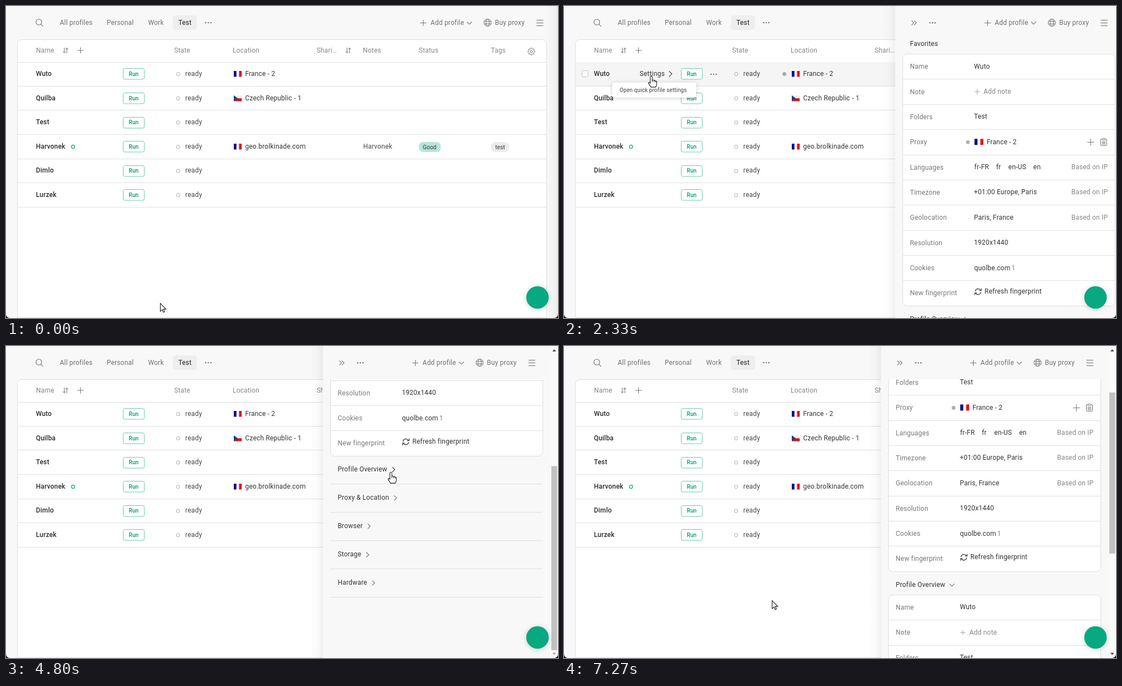
Write an HTML page with a canvas that moves like this. It is 996 by 562 pixels and loops after 7340 ms.

```html
<!DOCTYPE html>
<html lang="en">
<head>
<title>Quick profile settings</title>
<style>
html, body { margin: 0; width: 100%; height: 100%; overflow: hidden; background: #f8f8f8; }
canvas { display: block; }
</style>
</head>
<body>
<canvas id="stage" width="996" height="562"></canvas>
<script>
const W = 996, H = 562, LOOP = 7340, STEP = 200 / 3;
const PANEL_X = 572, ROW_H = 43.6, FIELD_H = 45.35, OPEN_H = 129;
const ctx = document.getElementById('stage').getContext('2d');

const GREY = '#707070', SOFT = '#868686', DARK = '#333', LINE = '#e0e0e0', GREEN = '#06a982';

const profiles = [
  { name: 'Wuto', flag: 'fr', place: 'France - 2' },
  { name: 'Quilba', flag: 'cz', place: 'Czech Republic - 1' },
  { name: 'Test' },
  { name: 'Harvonek', flag: 'fr', place: 'geo.brolkinade.com', tagged: true },
  { name: 'Dimlo' },
  { name: 'Lurzek' }
];
const favorites = ['Name', 'Note', 'Folders', 'Proxy', 'Languages', 'Timezone',
  'Geolocation', 'Resolution', 'Cookies', 'New fingerprint'];
const sections = ['Profile Overview', 'Proxy & Location', 'Browser', 'Storage', 'Hardware'];

// ---- timing ----
const ease = {
  lin: u => u,
  in: u => u * u,
  out: u => 1 - (1 - u) ** 2,
  both: u => u * u * (3 - 2 * u),
  slide: u => 1 - (1 - u) ** 3.05
};

// Each key is [time, values, ease used to arrive there].
const cursorKeys = [
  [533, [278, 535]], [1067, [203, 255], 'in'], [1333, [172, 149], 'out'],
  [1667, [157, 126], 'both'], [2800, [157, 126]], [2933, [232, 122], 'in'],
  [3400, [854, 232], 'out'], [4467, [854, 232]], [4800, [694, 227], 'both'],
  [5200, [694, 227]], [5533, [817, 249], 'both'], [6000, [817, 249]],
  [6400, [94, 533], 'both'], [6467, [46, 551]], [6533, [30, 580]],
  [7067, [30, 580]], [7133, [101, 547]], [7267, [375, 458], 'out']
];
const panelKeys = [[2133, [424]], [2467, [0], 'slide']];
const openKeys = [[4933, [0]], [5200, [1], 'both']];
const scrollKeys = [
  [3600, [0]], [3800, [84], 'in'], [4200, [342], 'out'], [5200, [342]],
  [5533, [471], 'both'], [5667, [471]], [6000, [134], 'both']
];

function sample(keys, t) {
  if (t <= keys[0][0]) return keys[0][1];
  for (let i = 1; i < keys.length; i++) {
    const [t0, a] = keys[i - 1], [t1, b, kind = 'lin'] = keys[i];
    if (t < t1) {
      const u = ease[kind]((t - t0) / (t1 - t0));
      return a.map((v, j) => v + (b[j] - v) * u);
    }
  }
  return keys[keys.length - 1][1];
}

// ---- drawing helpers ----
function text(s, x, y, color = DARK, { size = 12, weight = 400, align = 'left' } = {}) {
  ctx.font = `${weight} ${size}px Roboto, sans-serif`;
  ctx.letterSpacing = size < 12 ? '0.1px' : '0.2px';
  ctx.textAlign = align;
  ctx.fillStyle = color;
  ctx.fillText(s, x, Math.round(y));
  return ctx.measureText(s).width;
}
function box(x, y, w, h, r, fill, stroke) {
  ctx.beginPath();
  ctx.roundRect(x, y, w, h, r);
  if (fill) { ctx.fillStyle = fill; ctx.fill(); }
  if (stroke) { ctx.strokeStyle = stroke; ctx.lineWidth = 1; ctx.stroke(); }
}
function path(points, color, width = 1) {
  ctx.beginPath();
  for (let i = 0; i < points.length; i += 2) ctx.lineTo(points[i], points[i + 1]);
  ctx.strokeStyle = color;
  ctx.lineWidth = width;
  ctx.stroke();
}
function disc(x, y, r, fill) {
  ctx.beginPath();
  ctx.arc(x, y, r, 0, 7);
  ctx.fillStyle = fill;
  ctx.fill();
}
function ring(x, y, r, color, width = 1) {
  ctx.beginPath();
  ctx.arc(x, y, r, 0, 7);
  ctx.strokeStyle = color;
  ctx.lineWidth = width;
  ctx.stroke();
}
function rule(x0, x1, y, color = LINE) {
  ctx.fillStyle = color;
  ctx.fillRect(x0, Math.round(y - 0.5), x1 - x0, 1);
}
function plus(x, y, r, color) {
  path([x - r, y, x + r, y], color);
  path([x, y - r, x, y + r], color);
}
function dots(x, y, color = GREY) {
  for (const d of [-4.7, 0, 4.7]) disc(x + d, y, 1.2, color);
}
function chevron(x, y, w, h, color) { path([x, y - h, x + w, y, x, y + h], color, 1.1); }
function chevronDown(x, y, color) { path([x - 4.3, y - 2, x, y + 2.3, x + 4.3, y - 2], color, 1.1); }
function sortIcon(x, y) {
  path([x - 2.3, y - 5, x - 2.3, y + 4.5], GREY);
  path([x - 4.6, y + 2, x - 2.3, y + 4.5, x, y + 2], GREY);
  path([x + 2.3, y + 5, x + 2.3, y - 4.5], GREY);
  path([x, y - 2, x + 2.3, y - 4.5, x + 4.6, y - 2], GREY);
}
function flag(kind, x, y, w, h) {
  const part = (color, px, py, pw, ph) => {
    ctx.fillStyle = color;
    ctx.fillRect(x + px * w, y + py * h, pw * w, ph * h);
  };
  if (kind === 'fr') {
    part('#f4f4f4', 0, 0, 1, 1);
    part('#000f94', 0, 0, 1 / 3, 1);
    part('#e3101c', 2 / 3, 0, 1 / 3, 1);
  } else {
    part('#f0f0f0', 0, 0, 1, 0.5);
    part('#d7141a', 0, 0.5, 1, 0.5);
    ctx.beginPath();
    ctx.moveTo(x, y);
    ctx.lineTo(x + w / 2, y + h / 2);
    ctx.lineTo(x, y + h);
    ctx.fillStyle = '#11457e';
    ctx.fill();
  }
}
function gear(x, y) {
  ctx.beginPath();
  for (let i = 0; i <= 64; i++) {
    const a = i / 64 * Math.PI * 2;
    const r = 5.6 + Math.max(-0.9, Math.min(0.9, 1.8 * Math.cos(8 * a)));
    ctx.lineTo(x + r * Math.cos(a), y + r * Math.sin(a));
  }
  ctx.strokeStyle = GREY;
  ctx.lineWidth = 1;
  ctx.stroke();
  ring(x, y, 2.2, GREY);
}
function globe(x, y) {
  ring(x, y, 6.5, GREY);
  ctx.beginPath();
  ctx.ellipse(x, y, 3, 6.5, 0, 0, 7);
  ctx.stroke();
  path([x - 6, y - 2.3, x + 6, y - 2.3], GREY);
  path([x - 6, y + 2.3, x + 6, y + 2.3], GREY);
}
function refreshIcon(x, y) {
  ctx.strokeStyle = DARK;
  ctx.lineWidth = 1.2;
  for (const a of [0, Math.PI]) {
    ctx.save();
    ctx.translate(x, y);
    ctx.rotate(a);
    ctx.beginPath();
    ctx.arc(0, 0, 5.2, Math.PI * 1.02, Math.PI * 1.85);
    ctx.stroke();
    path([5.8, -6, 5.8, -2.3, 2.2, -2.3], DARK, 1.2);
    ctx.restore();
  }
}
function clipboard(x, y) {
  box(x - 5.5, y - 5, 11, 11.5, 1, null, GREY);
  box(x - 2.5, y - 6.5, 5, 3, 1, '#fff', GREY);
  for (const d of [-0.5, 1.7, 3.9]) path([x - 3.3, y + d, x + 3.3, y + d], GREY);
}

// ---- page ----
function topRight(x) {
  plus(x + 6, 30.5, 5.5, GREY);
  text('Add profile', x + 19, 34, GREY);
  chevronDown(x + 89, 30.5, GREY);
  globe(x + 122, 30);
  text('Buy proxy', x + 135.2, 34, GREY);
  for (const y of [25.5, 30.5, 35.5]) path([x + 210, y, x + 222.5, y], GREY);
}
function tabs() {
  ring(59.2, 29, 5.2, GREY, 1.1);
  path([63, 32.8, 67, 36.8], GREY, 1.1);
  text('All profiles', 97, 34, GREY);
  text('Personal', 181.7, 34, GREY);
  text('Work', 256.4, 34, GREY);
  box(301, 17, 43.5, 26, 5, '#eeeeee');
  text('Test', 311, 34, '#222');
  dots(365, 30);
}
function tableHead() {
  const heads = { Name: 54.2, State: 303.5, Location: 409, 'Shari\u2026': 560.4, Notes: 644, Status: 744.8, Tags: 875 };
  for (const label in heads) text(label, heads[label], 84, SOFT);
  sortIcon(107.5, 80);
  plus(134.5, 80, 5.5, GREY);
  sortIcon(617.5, 80);
  gear(948, 82);
  rule(21, 975, 101);
}
function tableRow(p, i, hovered, onSettings) {
  const mid = 122.3 + ROW_H * i, base = 126 + ROW_H * i;
  if (hovered) {
    const top = Math.round(101 + ROW_H * i);
    ctx.fillStyle = '#f5f5f5';
    ctx.fillRect(21, top, 954, ROW_H);
    box(32.5, Math.round(mid) - 5.5, 11, 11, 2, '#fafafa', '#c9c9c9');
    const tone = onSettings ? DARK : '#959595';
    text('Settings', 136.4, base, tone);
    chevron(189.5, mid, 5.2, 5, tone);
    dots(270, mid + 0.7);
    disc(397.6, mid + 0.2, 3.5, '#a8a8a8');
  }
  rule(21, 975, 101 + ROW_H * (i + 1) - 0.3);
  text(p.name, 54, base, '#2b2b2b', { weight: 500 });
  box(211.5, Math.round(mid - 10) + 0.5, 38, 19.5, 3, '#fff', '#6ac9b0');
  text('Run', 221.6, base, '#009a75', { size: 10, weight: 500 });
  ring(310.5, mid + 0.4, 3, '#a5a5a5');
  text('ready', 323.6, base, '#484848');
  if (p.flag) {
    flag(p.flag, 411, Math.round(mid - 5), 14.3, 10.5);
    text(p.place, 431.6, base);
  }
  if (p.tagged) {
    ring(121, mid + 0.4, 3, '#1bb08c', 1.3);
    text(p.name, 644.5, base, '#484848');
    box(745, 245, 39.5, 18, 8, '#b5e6da');
    text('Good', 752, 258, DARK, { size: 10.2 });
    box(875, 245, 33, 18, 8, '#ececee');
    text('test', 882.8, 258, DARK, { size: 10.2 });
  }
}
function tooltip() {
  ctx.save();
  ctx.shadowColor = 'rgba(0,0,0,.2)';
  ctx.shadowBlur = 7;
  ctx.shadowOffsetY = 1;
  box(87, 137.5, 151.5, 27.5, 4, '#fff');
  ctx.restore();
  text('Open quick profile settings', 100.2, 154.5, '#444', { size: 10 });
}

// ---- side panel ----
function fieldValue(label, mid) {
  const base = mid + 3.9, x = 714.2;
  const plain = { Name: profiles[0].name, Folders: 'Test', Timezone: '+01:00 Europe, Paris',
    Geolocation: 'Paris, France', Resolution: '1920x1440' };
  if (plain[label]) text(plain[label], x, base);
  if (label === 'Note') {
    plus(719.7, mid + 0.3, 4.5, '#a0a0a0');
    text('Add note', 731.4, base, SOFT);
  } else if (label === 'Proxy') {
    disc(703, mid + 0.3, 3.5, '#b0b0b0');
    flag('fr', 715, mid - 5.5, 16, 11);
    text(profiles[0].place, 737, base);
    plus(924.7, mid + 0.5, 6.3, GREY);
    clipboard(948, mid);
  } else if (label === 'Languages') {
    const langs = { 'fr-FR': 714.7, fr: 754, 'en-US': 776.2, en: 821.2 };
    for (const l in langs) text(l, langs[l], base);
  } else if (label === 'Cookies') {
    text('quolbe.com', 714.6, base);
    text('1', 781.8, base, SOFT);
  } else if (label === 'New fingerprint') {
    refreshIcon(721.5, mid - 2.3);
    text('Refresh fingerprint', 733.2, mid + 1.5);
  }
  if (['Languages', 'Timezone', 'Geolocation'].includes(label))
    text('Based on IP', 955.6, base, SOFT, { align: 'right' });
}
function fieldCard(labels, top) {
  box(585.5, Math.round(top) + 0.5, 383, Math.round(FIELD_H * labels.length), 8, '#fff', '#dedede');
  labels.forEach((label, i) => {
    const mid = top + 22.5 + FIELD_H * i;
    if (i) rule(586, 968, top + FIELD_H * i + 0.3);
    text(label, 598.6, mid + 4.4, '#777');
    fieldValue(label, mid);
  });
}
function sectionList(open, onHeader) {
  sections.forEach((label, i) => {
    const mid = 564 + 51.1 * i + (i ? OPEN_H * open : 0);
    const w = text(label, 598.4, mid + 4);
    const tone = !i && onHeader ? DARK : GREY;
    if (!i && open > 0.5) chevronDown(599 + w + 11.5, mid + 0.4, tone);
    else chevron(598.4 + w + 9, mid + 0.6, 4.6, 4.4, tone);
    if (i || !open) rule(585, 968, mid + 26.3);
  });
  if (open) {
    ctx.save();
    ctx.beginPath();
    ctx.rect(580, 581, 400, 138 * open);
    ctx.clip();
    fieldCard(favorites.slice(0, 3), 582);
    ctx.restore();
  }
}
function scrollBar(scroll, open) {
  const content = 904 + OPEN_H * open, track = 533.5, max = content - H;
  ctx.fillStyle = '#f9f9f9';
  ctx.fillRect(982, 0, 14, H);
  ctx.fillStyle = '#c1c1c1';
  ctx.fillRect(984, 14.5 + track * scroll / content, 10.5, track * H / content);
  const arrow = (y, d, on) => {
    ctx.beginPath();
    ctx.moveTo(985.8, y + d);
    ctx.lineTo(989.2, y - 2 * d);
    ctx.lineTo(992.6, y + d);
    ctx.fillStyle = on ? '#404040' : '#a3a3a3';
    ctx.fill();
  };
  arrow(8.5, 1.3, scroll > 0.5);
  arrow(554, -1.3, scroll < max - 1.5);
}
function panel(dx, scroll, open, onHeader) {
  ctx.save();
  ctx.translate(dx, 0);
  const shade = ctx.createLinearGradient(PANEL_X - 24, 0, PANEL_X, 0);
  shade.addColorStop(0, 'rgba(0,0,0,0)');
  shade.addColorStop(0.55, 'rgba(0,0,0,.015)');
  shade.addColorStop(1, 'rgba(0,0,0,.06)');
  ctx.fillStyle = shade;
  ctx.fillRect(PANEL_X - 24, 0, 24, H);
  ctx.fillStyle = '#f8f8f8';
  ctx.fillRect(PANEL_X, 0, 424, H);
  chevron(601.5, 30.3, 4, 4, GREY);
  chevron(606, 30.3, 4, 4, GREY);
  dots(639.3, 30.3);
  topRight(732.6);

  ctx.save();
  ctx.beginPath();
  ctx.rect(PANEL_X, 60, 410, H - 60);
  ctx.clip();
  ctx.translate(0, -Math.round(scroll));
  text('Favorites', 598.6, 72);
  fieldCard(favorites, 86.3);
  sectionList(open, onHeader);
  ctx.restore();

  scrollBar(scroll, open);
  ctx.restore();
}

// ---- pointer ----
const arrowShape = new Path2D('M0 0V14.6L3.4 11.4L5.6 16.2L7.8 15.2L5.7 10.6H10.2Z');
const handShape = new Path2D('M-1.8 1.8Q-1.8 0 0 0T1.8 1.8V7.2Q4.2 6 5.2 7.9Q7.2 7 8 8.8' +
  'Q9.8 8.3 9.8 10.5V14.2Q9.8 16.5 8 19.6H-.8Q-2.4 16.2-4.8 13.3Q-5.4 11.4-4 11.1Q-3 10.9-1.8 12.5Z' +
  'M1.8 7V10.5M5.2 8V10.8M8 8.8V11');
function pointer(x, y, hand) {
  ctx.save();
  ctx.translate(Math.round(x) + 0.5, Math.round(y) + 0.5);
  const shape = hand ? handShape : arrowShape;
  ctx.fillStyle = '#fff';
  ctx.fill(shape);
  ctx.strokeStyle = '#1c1c22';
  ctx.lineWidth = 1.1;
  ctx.stroke(shape);
  ctx.restore();
}

function render(t) {
  const [cx, cy] = sample(cursorKeys, t);
  const [dx] = sample(panelKeys, t);
  const [open] = sample(openKeys, t);
  const [scroll] = sample(scrollKeys, t);

  const overTable = cx > 21 && cx < PANEL_X + dx;
  const row = overTable ? Math.floor((cy - 101) / ROW_H) : -1;
  const inRow = row >= 0 && row < profiles.length && Math.abs(cy - 122 - ROW_H * row) < 10;
  const onSettings = inRow && cx > 136 && cx < 198;
  const onRun = inRow && cx > 211 && cx < 250;
  const onHeader = !dx && cx > 598 && cx < 706 && Math.abs(cy - (564 - scroll)) < 10;

  ctx.fillStyle = '#f8f8f8';
  ctx.fillRect(0, 0, W, H);
  tabs();
  topRight(747);
  box(20.5, 60.5, 955, 501, [8, 8, 0, 0], '#fff', '#dfdfdf');
  tableHead();
  profiles.forEach((p, i) => tableRow(p, i, i === row, i === row && onSettings));
  if (t > 1660 && t < 2860) tooltip();
  panel(dx, scroll, open, onHeader);

  ctx.save();
  ctx.shadowColor = 'rgba(0,0,0,.18)';
  ctx.shadowBlur = 10;
  ctx.shadowOffsetY = 1;
  disc(959, 525, 20.3, GREEN);
  ctx.restore();

  pointer(cx, cy, onSettings || onRun || onHeader);

  // dark window corners
  ctx.beginPath();
  ctx.rect(0, 0, W, H);
  ctx.roundRect(0, 0, W, H, [0, 0, 7, 7]);
  ctx.fillStyle = '#111';
  ctx.fill('evenodd');
}

const start = performance.now();
function tick() {
  const t = (performance.now() - start) % LOOP;
  render(Math.min(109, Math.floor((t + 5) / STEP)) * STEP + 0.5);
  requestAnimationFrame(tick);
}
tick();
</script>
</body>
</html>
```
